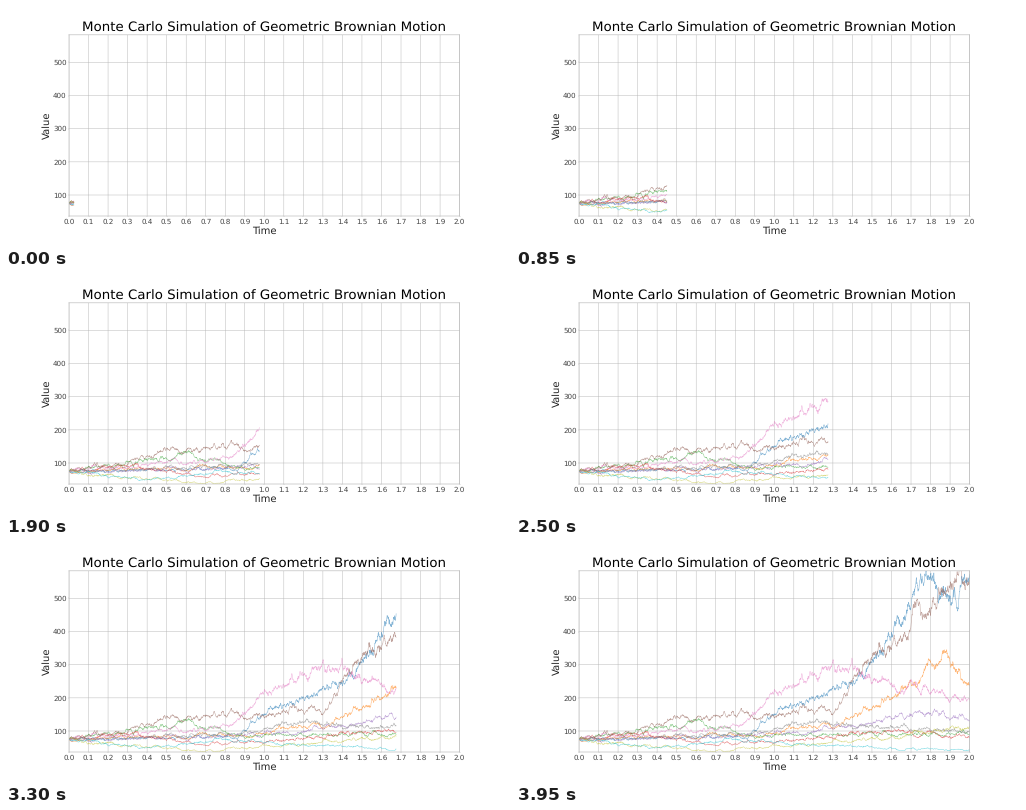
A matplotlib script for the animation above (4 s loop, 504 by 240 pixels).

```python
import numpy as np
import matplotlib.pyplot as plt
from matplotlib.animation import FuncAnimation

FRAMES, CHUNK, PIN = 80, 25, 80
STEPS = FRAMES * CHUNK
T_END, START, SIGMA = 2.0, 75, 0.42
Y_MIN, Y_MAX = 36.6, 583.6

plt.rcParams.update({"font.family": "DejaVu Sans", "text.hinting": "none"})
rng = np.random.default_rng(12)
time = np.linspace(0, T_END, STEPS + 1)

# Turning points (time, value) of each path; noise fills in the rest
TURNS = {
    "tab:blue": [(.86, 84), (1, 160), (1.4, 255), (1.77, 565), (1.86, 465),
                 (2, 560)],
    "tab:orange": [(.9, 88), (1.35, 130), (1.87, 320), (2, 242)],
    "tab:green": [(.58, 130), (.9, 86), (2, 90)],
    "tab:red": [(.3, 95), (.7, 58), (1.6, 100), (2, 80)],
    "tab:purple": [(1, 86), (1.8, 160), (2, 130)],
    "tab:brown": [(.51, 138), (1.27, 160), (1.5, 330), (1.65, 355), (1.87, 550),
                  (2, 555)],
    "tab:pink": [(.83, 118), (.95, 195), (1.28, 295), (2, 195)],
    "tab:gray": [(.9, 92), (1.17, 126), (2, 100)],
    "tab:olive": [(.3, 55), (.7, 42), (2, 114)],
    "tab:cyan": [(.4, 50), (.8, 74), (1.58, 48), (2, 43)],
}


def make_path(turns):
    """Geometric Brownian noise pinned around a log-linear trend."""
    t, v = np.array([(0, START)] + turns).T
    trend = np.interp(time, t, np.log(v))
    shocks = rng.normal(0, SIGMA * np.sqrt(T_END / STEPS), STEPS)
    walk = np.concatenate(([0], np.cumsum(shocks)))
    bridge = walk - np.interp(time, time[::PIN], walk[::PIN])
    return np.clip(np.exp(trend + bridge), Y_MIN, Y_MAX)


fig, ax = plt.subplots(figsize=(21, 10), dpi=24, facecolor="white")
fig.subplots_adjust(left=.125, right=.9, bottom=.125, top=.88)
ax.set(xlim=(0, T_END), ylim=(Y_MIN, Y_MAX))
ax.set_xticks(np.arange(21) / 10)
ax.set_yticks(range(100, 501, 100))
ax.set_title("Monte Carlo Simulation of Geometric Brownian Motion",
             fontsize=40, pad=8)
ax.set_xlabel("Time", fontsize=30, color="#222222", labelpad=2)
ax.set_ylabel("Value", fontsize=30, color="#222222", labelpad=3)
ax.tick_params(labelsize=21.5, color="#999999", labelcolor="#444444",
               length=3.5, width=1)
ax.grid(color="#b2b2b2", linewidth=1.3, snap=False)
ax.set_axisbelow(True)
for spine in ax.spines.values():
    spine.set(color="#bcbcbc", linewidth=2, snap=False)

paths = [make_path(turns) for turns in TURNS.values()]
lines = [ax.plot([], [], color=color, linewidth=1.5, alpha=.55)[0]
         for color in TURNS]


def update(frame):
    end = (frame + 1) * CHUNK + 1
    for line, path in zip(lines, paths):
        line.set_data(time[:end], path[:end])
    return lines


anim = FuncAnimation(fig, update, frames=FRAMES, interval=50,
                     repeat=True, repeat_delay=0, blit=False)
plt.show()
```
